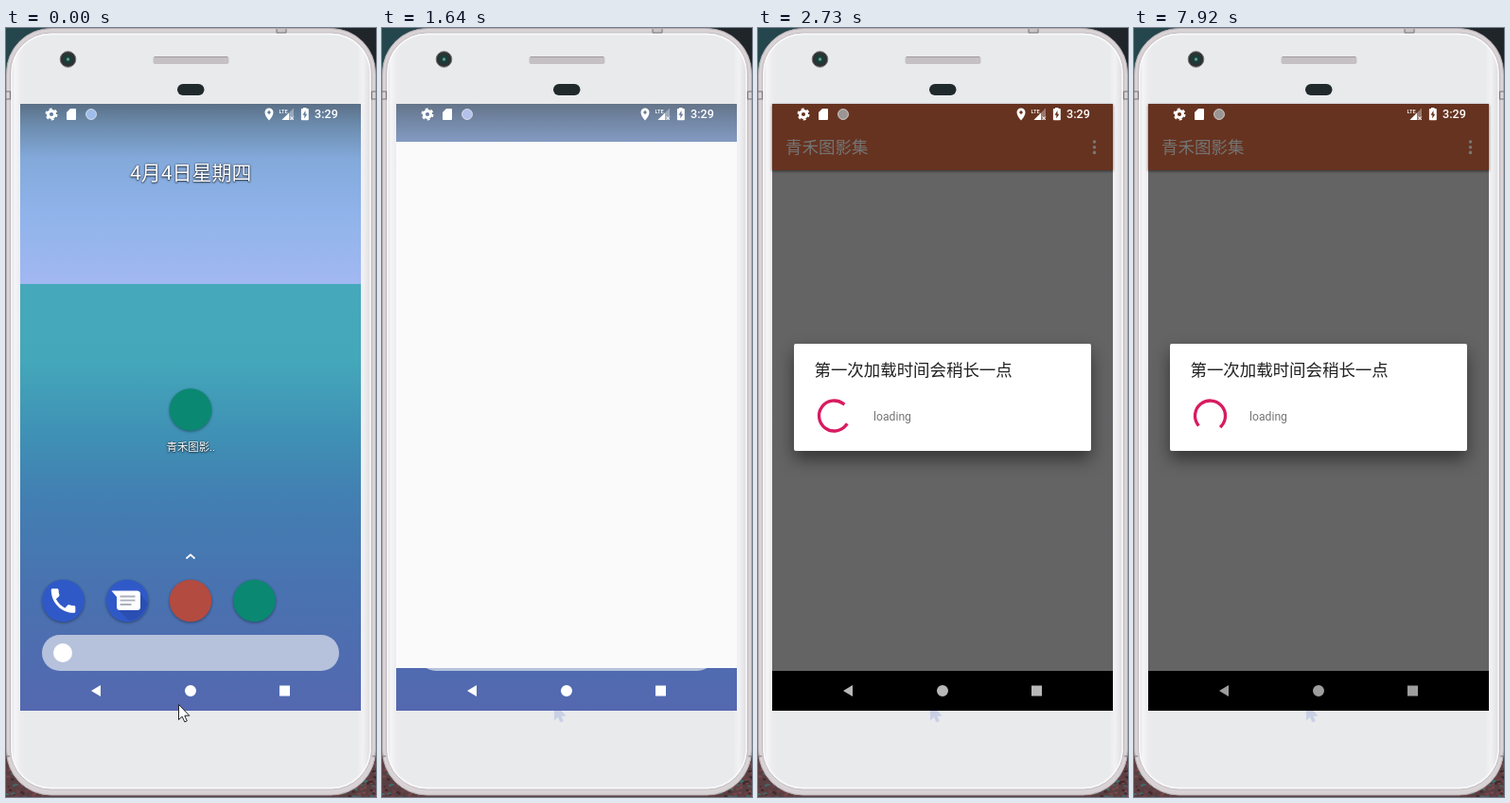
Recreate the animation shown at these times as an HTML page. Size 391 by 811 pixels, loop 8000 ms.

```html
<!DOCTYPE html>
<html lang="zh">
<head>
<meta charset="utf-8">
<style>
html, body { margin: 0; width: 100%; height: 100%; overflow: hidden; background: #20282c; }
svg { display: block; width: 391px; height: 811px; font-family: Roboto, "Noto Sans CJK SC", "Noto Sans CJK", sans-serif; }
.lift { filter: drop-shadow(0 1px 1.5px #0006); }
.glow { fill: #fff; text-shadow: 0 0 2px #000a, 0 1px 2px #000a; }
</style>
</head>
<body>
<svg viewBox="0 0 391 811">
  <defs>
    <linearGradient id="back">
      <stop stop-color="#24474d"/><stop offset=".5" stop-color="#23363b"/><stop offset="1" stop-color="#1f2428"/>
    </linearGradient>
    <linearGradient id="body">
      <stop stop-color="#d8d5d8"/><stop offset=".012" stop-color="#f5f5f7"/><stop offset=".028" stop-color="#ececef"/>
      <stop offset=".04" stop-color="#e9eaec"/><stop offset=".96" stop-color="#e9eaec"/>
      <stop offset=".975" stop-color="#f2f2f4"/><stop offset="1" stop-color="#dcd9dc"/>
    </linearGradient>
    <linearGradient id="sky" x2="0" y2="1">
      <stop stop-color="#5b7087"/><stop offset=".12" stop-color="#6c8cae"/><stop offset=".3" stop-color="#83a9da"/>
      <stop offset=".6" stop-color="#8fb3ea"/><stop offset="1" stop-color="#a2b8f2"/>
    </linearGradient>
    <linearGradient id="skyLate" x2="0" y2="1">
      <stop stop-color="#647489"/><stop offset=".12" stop-color="#768bac"/><stop offset=".3" stop-color="#91a9d6"/>
      <stop offset=".6" stop-color="#9cb0e2"/><stop offset="1" stop-color="#a8b4ec"/>
    </linearGradient>
    <linearGradient id="sea" x2="0" y2="1">
      <stop stop-color="#45a9bb"/><stop offset=".18" stop-color="#44a7ba"/><stop offset=".35" stop-color="#3f91b5"/>
      <stop offset=".5" stop-color="#427fb2"/><stop offset=".72" stop-color="#4972b0"/><stop offset="1" stop-color="#5468b0"/>
    </linearGradient>
    <linearGradient id="seaLate" x2="0" y2="1">
      <stop stop-color="#3fa2bf"/><stop offset=".18" stop-color="#3fa0bd"/><stop offset=".35" stop-color="#3b8bb6"/>
      <stop offset=".5" stop-color="#407cb2"/><stop offset=".72" stop-color="#4971b0"/><stop offset="1" stop-color="#5468b0"/>
    </linearGradient>
    <clipPath id="below"><path d="M170 720h40v20h-40z"/></clipPath>
    <path id="arrow" d="M.5.5V16.5L4.2 13.2 6.8 18.8 9.3 17.7 6.8 12.2H11.8Z"/>
  </defs>

  <path fill="url(#back)" d="M0 0h391v811H0z"/>
  <path fill="#5a3f42" d="M0 760h391v51H0z"/>
  <g id="rug"></g>

  <!-- phone shell -->
  <rect x=".5" y=".5" width="390" height="808.5" rx="47" fill="#d9d3d6" stroke="#b3acb0"/>
  <rect x="4.5" y="5" width="382" height="798" rx="43" fill="url(#body)" stroke="#b9b3b7" stroke-width=".8"/>
  <rect x="6" y="6.5" width="379" height="795" rx="41.5" fill="none" stroke="#f9f9fa" stroke-width="1.5"/>
  <path d="M0 67h4.500v8H0M391 67h-4.500v8h4.500M0 768h4M387 768h4" fill="none" stroke="#77747a" stroke-width="1.200"/>
  <path d="M286 1v4h10V1" fill="#c9c4c7" stroke="#77747a"/>
  <rect x="155.5" y="30" width="80" height="8" rx="2" fill="#c5c0c3"/>
  <path d="M157 30.5H234" stroke="#a09a9e"/>
  <rect x="181" y="59" width="28.5" height="12" rx="6" fill="#20292c"/>
  <circle cx="65.5" cy="33" r="8.3" fill="#2c3233" stroke="#777"/>
  <circle cx="65.5" cy="33" r="4.6" fill="#173f3a"/>
  <circle cx="65.5" cy="33" r="1.7" fill="#6a9488"/>

  <g id="home">
    <path id="top" d="M15 80h360v190H15z"/>
    <path id="bottom" d="M15 270h360v450H15z"/>
    <text class="glow" x="131" y="159.5" font-size="21">4月4日星期四</text>
    <g id="launcher">
      <circle class="lift" cx="195" cy="402.5" r="22.3" fill="#0b8872"/>
      <text class="glow" x="169.5" y="446" font-size="11.4">青禾图影..</text>
    </g>
    <path d="M190.5 559.5l4.5-4 4.5 4" fill="none" stroke="#fff" stroke-width="1.7"/>
    <g class="lift">
      <circle cx="60.5" cy="604" r="22.3" fill="#3059c8"/>
      <circle cx="128" cy="604" r="22.3" fill="#3059c8"/>
      <circle cx="195" cy="604" r="22.3" fill="#b34b40"/>
      <circle cx="262.5" cy="604" r="22.3" fill="#0b8872"/>
    </g>
    <path transform="translate(43.5 587) scale(1.42)" fill="#fff" d="M6.6 10.8c1.4 2.8 3.8 5.1 6.6 6.6l2.2-2.2c.3-.3.7-.4 1-.2 1.1.4 2.3.6 3.6.6.6 0 1 .4 1 1V20c0 .6-.4 1-1 1C10.6 21 3 13.4 3 4c0-.6.5-1 1-1h3.5c.6 0 1 .5 1 1 0 1.3.2 2.5.6 3.6.1.4 0 .7-.2 1z"/>
    <path fill="#2a4fb2" d="M118 613l12 12q14-2 20-18l-9-11z"/>
    <path fill="#fff" d="M111.5 593.5h27q3.500 0 3.500 3.500v13.500q0 3.500-3.500 3.500h-18q-3.500 0-3.500-3.500V600z"/>
    <path d="M120.500 599.500h16M120.500 603.700h16M120.500 608h12" stroke="#a9b0bd" stroke-width="1.800"/>
    <rect x="38" y="640" width="314" height="38" rx="19" fill="#b6c2dc"/>
    <circle cx="60" cy="659" r="10" fill="#fff"/>
  </g>

  <path id="pane" fill="#fafafa"/>

  <g id="app">
    <path fill="#fafafa" d="M15 80h360v598H15z"/>
    <path fill="#000" d="M15 678h360v42H15z"/>
    <path fill="#ff7f50" d="M15 80h360v21H15z"/>
    <g id="page">
      <path fill="#646464" d="M15 150h360v528H15z"/>
      <path fill="#663320" d="M15 80h360v70H15z" style="filter:drop-shadow(0 1px 1.5px #0008)"/>
      <text x="29" y="132" font-size="17.5" fill="#747474">青禾图影集</text>
      <g fill="#777"><circle cx="355.5" cy="120" r="1.8"/><circle cx="355.5" cy="125.7" r="1.8"/><circle cx="355.5" cy="131.4" r="1.8"/></g>
      <rect x="38" y="333" width="314" height="113" rx="2" fill="#fff" style="filter:drop-shadow(0 9px 9px #0007)"/>
      <text x="59.5" y="367" font-size="17.45" fill="#212121">第一次加载时间会稍长一点</text>
      <text x="122" y="414" font-size="12.2" fill="#757575">loading</text>
      <path id="ring" fill="none" stroke="#d81b60" stroke-width="3.3" stroke-linecap="square"/>
    </g>
  </g>

  <!-- status icons -->
  <g fill="#fff">
    <circle cx="48" cy="91" r="3.6" fill="none" stroke="#fff" stroke-width="3"/>
    <circle cx="48" cy="91" r="5.5" fill="none" stroke="#fff" stroke-width="2" stroke-dasharray="2.88"/>
    <path d="M68 85h5q1 0 1 1v10q0 1-1 1h-8q-1 0-1-1v-7z"/>
    <circle id="dot" cx="90" cy="91" r="5.5" stroke="#fff" stroke-opacity=".6"/>
    <path id="pin" fill-rule="evenodd" d="M278 97.5q-4.500-5-4.500-8.500a4.500 4.500 0 0 1 9 0q0 3.500-4.500 8.500zM278 87.300a1.700 1.700 0 1 0 .01 0z"/>
    <path d="M304 84.500V97H291.500z" opacity=".35"/>
    <path d="M299 89.500V97H291.500z"/>
    <path d="M300.500 93.500l3.300 3.500m0-3.500l-3.300 3.500" stroke="#fff"/>
    <text x="288.5" y="89.5" font-size="5.8" font-weight="500">LTE</text>
    <path fill-rule="evenodd" d="M314 85v-1h3.500v1h1.500q.8 0 .8.800v10.700q0 .8-.8.800h-6.300q-.8 0-.8-.8V85.800q0-.8.800-.8zM316.500 87l-3 4.800h1.800V95.500l3-4.800h-1.800z"/>
    <text x="326" y="95.3" font-size="12.6" font-weight="500">3:29</text>
  </g>
  <path id="nav" d="M90 699l10-6v12zM201 699a6 6 0 1 1-12 0 6 6 0 0 1 12 0zM289 693.5h11v11h-11z"/>

  <!-- faint trail left by the pointer -->
  <g id="trail" clip-path="url(#below)"><use href="#arrow" x="182" y="713" fill="#c9d0e6" stroke="#c9d0e6"/></g>
  <use id="cursor" href="#arrow" fill="#fff" stroke="#222"/>
</svg>
<script>
const $ = id => document.getElementById(id);
const set = (id, attrs) => { for (const k in attrs) $(id).setAttribute(k, attrs[k]); };
const show = (id, on) => { $(id).style.display = on ? '' : 'none'; };
const clamp = x => Math.max(0, Math.min(1, x));
const mix = (a, b, k) => a + (b - a) * k;

// speckled surface behind the lower corners
let seed = 7;
const rnd = () => (seed = seed * 16807 % 2147483647) / 2147483647;
const tones = ['#7d4a4c', '#3f6b6b', '#40272b', '#6b4246'];
let specks = '';
for (let i = 0; i < 400; i++) {
  const x = (rnd() * 45 + (i % 2 ? 346 : 0)).toFixed(1), y = (760 + rnd() * 51).toFixed(1);
  specks += `<path fill="${tones[Math.floor(rnd() * 4)]}" d="M${x} ${y}h3v2h-3z"/>`;
}
$('rug').innerHTML = specks;

// growth of the arc's leading end over half a cycle
function ease(x) {
  let lo = 0, hi = 1;
  for (let i = 0; i < 24; i++) {
    const s = (lo + hi) / 2, r = 1 - s;
    if (.6 * s * r * r + .3 * s * s * r + .5 * s ** 3 < x) lo = s; else hi = s;
  }
  return lo * lo * (3 - 2 * lo);
}

function drawRing(t) {
  const phase = ((t - 2096) / 1333.3 % 1 + 1) % 1;
  const turn = -90 + phase * 90 + 83 + (t - 2744) * .162;
  const start = turn + 270 * (phase > .5 ? 1 - ease(1 - phase) : 0);
  const end = Math.max(start + .3, turn + 270 * (phase < .5 ? ease(phase) : 1));
  const at = a => {
    a *= Math.PI / 180;
    return `${(80.5 + 16 * Math.cos(a)).toFixed(3)} ${(409 + 16 * Math.sin(a)).toFixed(3)}`;
  };
  set('ring', { d: `M${at(start)}A16 16 0 ${end - start > 180 ? 1 : 0} 1 ${at(end)}` });
}

// the screen is refreshed in steps, about seven a second
function hold(t) {
  return t < 2430 ? Math.floor((t + 10) / 149) * 149 : 2430 + Math.floor((t - 2410) / 156.9) * 156.9;
}

function draw(time) {
  const t = hold(time % 8000);
  const late = t > 1300, app = t > 1750, page = t > 2500;
  set('top', { fill: late ? 'url(#skyLate)' : 'url(#sky)' });
  set('bottom', { fill: late ? 'url(#seaLate)' : 'url(#sea)' });
  show('home', !app);
  show('launcher', t < 1450);
  show('pane', t > 1450 && !app);
  set('pane', { d: t < 1600 ? 'M48.5 286h293v231h-293z' : 'M15 120h360v555H15z' });
  show('app', app);
  show('page', page);
  set('dot', { fill: page ? '#9b9694' : app ? '#ffb79c' : late ? '#b4c1ea' : '#9fbdea' });
  show('pin', t < 3200);
  const grey = Math.round(mix(235, 158, clamp((t - 2430) / 470)));
  set('nav', { fill: app ? `rgb(${grey},${grey},${grey})` : '#fff' });

  const k = clamp((t - 100) / 800), s = k * k * (3 - 2 * k);
  show('trail', k > 0);
  show('cursor', t < 1600);
  set('cursor', t < 1450 ? { x: mix(182, 197, s), y: mix(713, 405, s) } : { x: 351, y: 430 });
  drawRing(t);
}

const began = performance.now();
function loop() {
  draw(performance.now() - began);
  requestAnimationFrame(loop);
}
loop();
</script>
</body>
</html>
```
